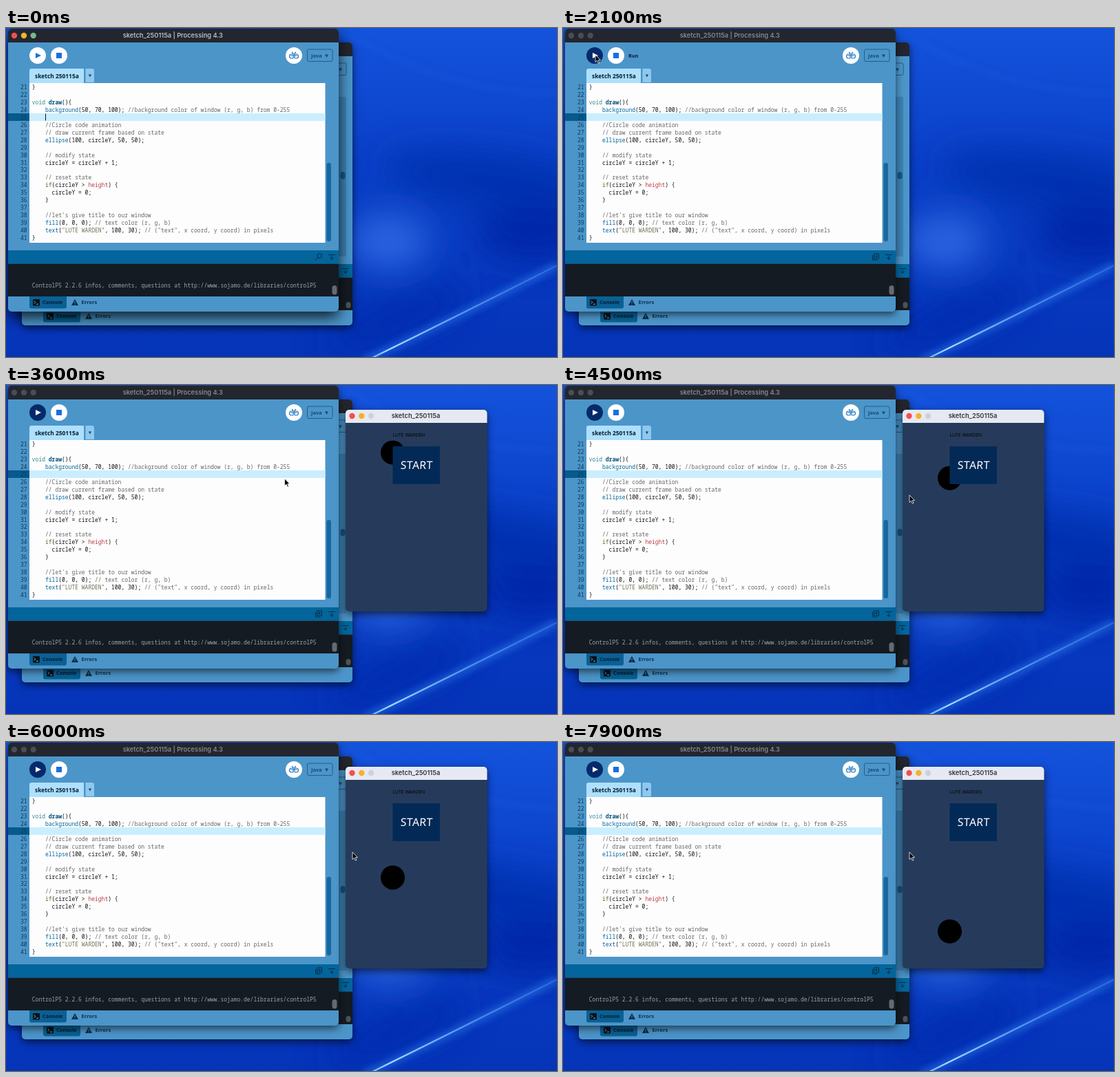
An HTML page for the animation above (8000 ms loop, 800 px wide and 478 px high).

```html
<!DOCTYPE html>
<html lang="en">
<head>
<meta charset="utf-8">
<title>Sketch launch</title>
<style>
html, body { margin: 0; width: 100%; height: 100%; overflow: hidden; background: #0838c0 }
svg { display: block; width: 800px; height: 478px }
text { white-space: pre }
.code { font: 8px "Noto Sans Mono", monospace }
.ui { font: 700 7.5px "Noto Sans", sans-serif; fill: #041c30 }
.title { font: 600 9.25px Inter, sans-serif; text-anchor: middle }
.shadow { filter: drop-shadow(0 4px 6px #0009) }
.shadow.active { filter: drop-shadow(0 8px 10px #000c) }
.com { fill: #666 }
.str { fill: #6d7050 }
.typ { fill: #2b8a90 }
.fun { fill: #006699 }
.def { fill: #00507a; font-weight: 700 }
.key { fill: #55702a }
.var { fill: #bd3b45 }
</style>
</head>
<body>
<svg viewBox="0 0 800 478">
  <defs>
    <linearGradient id="sky" x1="0" y1="0" x2="0" y2="1">
      <stop offset="0" stop-color="#1453dc"/><stop offset=".4" stop-color="#0a40c8"/><stop offset="1" stop-color="#0534b8"/>
    </linearGradient>
    <linearGradient id="ray" x1="500" x2="800" y1="0" y2="0" gradientUnits="userSpaceOnUse">
      <stop offset="0" stop-color="#5cc4ff" stop-opacity=".6"/><stop offset=".2" stop-color="#a8dcff"/><stop offset=".6" stop-color="#5c9cf4" stop-opacity=".8"/><stop offset="1" stop-color="#3f80e8" stop-opacity=".5"/>
    </linearGradient>
    <filter id="soft" x="-50%" y="-50%" width="200%" height="200%"><feGaussianBlur stdDeviation="24"/></filter>
    <filter id="haze" x="-20%" y="-20%" width="140%" height="140%"><feGaussianBlur stdDeviation="5"/></filter>
    <clipPath id="pane"><rect x="493" y="55" width="205" height="274"/></clipPath>

    <g id="shell">
      <rect x="3" y="1" width="480" height="411" rx="5" fill="#4c95c9"/>
      <path d="M3 21V6a5 5 0 0 1 5-5H478a5 5 0 0 1 5 5V21Z" fill="#23262f"/>
      <rect x="437.500" y="31" width="36.500" height="17.500" rx="2" fill="none" stroke="#1c5f91"/>
      <text class="ui" x="443" y="42.700" style="fill:#174c78;font-weight:600">Java</text>
      <path d="M463 38.500h5l-2.500 4.500Z" fill="#174c78"/>
      <path d="M3 323H483V342.500H3Z" fill="#03659c"/>
      <path d="M3 342.500H483V390H3Z" fill="#141b22"/>
      <path d="M468 329.500h10M473 331v5m-2.500 -2.500l2.500 3l2.500 -3" fill="none" stroke="#082b45"/>
      <path d="M34 390H88V404.500a3 3 0 0 1 -3 3H37a3 3 0 0 1 -3 -3Z" fill="#0a6094"/>
      <rect x="39" y="394" width="10" height="9.500" rx="1" fill="#07131d"/>
      <path d="M40.800 396.500l2 2l-2 2M44 401.200h3" fill="none" stroke="#b9d9ee" stroke-width=".8"/>
      <text class="ui" x="53" y="401.200">Console</text>
      <path d="M100 394l5 9H95Z" fill="#092d49"/>
      <path d="M100 397v3m0 1v1" stroke="#4c95c9"/>
      <text class="ui" x="109.500" y="401.200" style="fill:#0a3350">Errors</text>
    </g>
  </defs>

  <rect width="800" height="478" fill="url(#sky)"/>
  <g filter="url(#soft)">
    <ellipse cx="720" cy="225" rx="170" ry="40" fill="#0230b0" transform="rotate(8 720 225)"/>
    <ellipse cx="765" cy="300" rx="80" ry="40" fill="#0128a8"/>
    <ellipse cx="555" cy="310" rx="60" ry="40" fill="#2a64e0"/>
    <ellipse cx="570" cy="420" rx="110" ry="24" fill="#042cae" transform="rotate(-22 570 420)"/>
  </g>
  <g fill="none">
    <path d="M500 10Q640 95 800 95" stroke="#2766e6" stroke-width="5" opacity=".3" filter="url(#haze)"/>
    <path d="M520 484Q660 418 800 345" stroke="#2f7cf0" stroke-width="12" opacity=".5" filter="url(#haze)"/>
    <path d="M530 480Q660 416 800 345" stroke="url(#ray)" stroke-width="2.500"/>
  </g>

  <g class="shadow">
    <use href="#shell" x="20" y="20"/>
    <path d="M483 100H494V332H483Z" fill="#3c82b5"/>
    <rect x="485.500" y="209" width="7" height="10.500" rx="3.500" fill="#1a557f"/>
    <rect x="493.500" y="398" width="7" height="9" rx="3.500" fill="#4d5257"/>
  </g>

  <g id="editor" class="shadow">
    <use href="#shell"/>
    <rect x="473.500" y="374" width="7" height="13.500" rx="3.500" fill="#666a70"/>
    <g id="lights"></g>
    <text id="title" class="title" x="242.300" y="14.300">sketch_250115a | Processing 4.3</text>
    <circle id="play" cx="46" cy="40" r="12"/>
    <path id="arrow" d="M43 36l8 4l-8 4Z"/>
    <circle cx="77" cy="40" r="12" fill="#fff"/>
    <path d="M73 36h8v8h-8Z" fill="#1b6fe0"/>
    <text id="hint" class="ui" x="95" y="42.700" style="font-size:7.2px">Run</text>
    <circle cx="418" cy="40" r="12" fill="#fff"/>
    <g fill="none" stroke="#2378c0" stroke-width="1.200">
      <path d="M415 35l2 2v7M421 35l-2 2v7M413 40h10"/>
      <path d="M417 38h-2.500a1.500 1.500 0 0 0 0 6h2.500M419 38h2.500a1.500 1.500 0 0 1 0 6h-2.500"/>
    </g>
    <path d="M34 80V62a3 3 0 0 1 3 -3H113V80Z" fill="#aee0fd"/>
    <text class="ui" x="42" y="72.700" style="font-size:8.4px">sketch 250115a</text>
    <path d="M115.500 59H125a3 3 0 0 1 3 3V79H115.500Z" fill="#8ec8ee"/>
    <path d="M119.700 67.500h4.400l-2.200 4Z" fill="#174c78"/>
    <path d="M34 80H463.500V312H34Z" fill="#fdfdfe"/>
    <path d="M3 124H34V135H3Z" fill="#075a8c"/>
    <path d="M34 124H463.500V135H34Z" fill="#caeefe"/>
    <rect x="465.500" y="196" width="6.500" height="114" rx="3" fill="#17689f"/>
    <g id="code" class="code"></g>
    <path id="caret" d="M57.500 124.500v10" stroke="#111"/>
    <g fill="none" stroke="#082b45">
      <path id="find" d="M458.500 331a3.300 3.300 0 1 0 -6.600 0a3.300 3.300 0 1 0 6.600 0M452.700 333.500l-3 3.500"/>
      <path id="copy" d="M451.500 328h7v7h-7ZM449.500 330v7h7M455 329.500v4m-2 -2h4"/>
    </g>
    <text id="log" class="code" x="37.800" y="376.900" fill="#9da3a8">ControlP5 2.2.6 infos, comments, questions at http://www.sojamo.de/libraries/controlP5</text>
  </g>

  <g id="app" class="shadow">
    <rect x="493" y="36" width="205.500" height="293" rx="5" fill="#263b5b"/>
    <path d="M493 55V41a5 5 0 0 1 5 -5H693.500a5 5 0 0 1 5 5V55Z" fill="#e7e9f2"/>
    <circle cx="502.500" cy="45" r="4.200" fill="#f4504c"/>
    <circle cx="516.300" cy="45" r="4.200" fill="#f5b02c"/>
    <circle cx="530" cy="45" r="4.200" fill="#cfd1d8"/>
    <text class="title" x="595" y="48.300" fill="#33353b">sketch_250115a</text>
    <g clip-path="url(#pane)"><circle id="ball" cx="561.500" r="17.500"/></g>
    <text x="561.500" y="75.300" style="font:6.9px 'Open Sans',sans-serif">LUTE WARDEN</text>
    <path d="M561.500 89H630V144H561.500Z" fill="#032a57"/>
    <text transform="translate(572.500 121.500) skewX(-3)" fill="#fff" style="font:500 15.8px 'Noto Sans',sans-serif;letter-spacing:.4px">START</text>
  </g>

  <path id="cursor" d="M0 0V10.500L2.500 8.300L4.300 12.200L6 11.400L4.200 7.700H7.500Z" stroke="#fff" stroke-width=".8"/>
</svg>
<script>
const el = id => document.getElementById(id);
const show = (id, on) => el(id).setAttribute("visibility", on ? "visible" : "hidden");
const fill = (id, color) => el(id).setAttribute("fill", color);

const source = `}

void draw(){
    background(50, 70, 100); //background color of window (r, g, b) from 0-255

    //Circle code animation
    // draw current frame based on state
    ellipse(100, circleY, 50, 50);

    // modify state
    circleY = circleY + 1;

    // reset state
    if(circleY > height) {
      circleY = 0;
    }

    //let's give title to our window
    fill(0, 0, 0); // text color (r, g, b)
    text("LUTE WARDEN", 100, 30); // ("text", x coord, y coord) in pixels
}`;
const kinds = ["com", "str", "typ", "def", "key", "var", "fun"];
const tokens = /(\/\/.*)|("[^"]*")|\b(void)\b|\b(draw)\b|\b(if)\b|\b(height)\b|\b(background|ellipse|fill|text)\b/g;
const paint = line => line.replace(tokens, (word, ...groups) =>
  `<tspan class="${kinds[groups.findIndex(Boolean)]}">${word}</tspan>`);

el("code").innerHTML = source.split("\n").map((line, i) => {
  const y = 89 + i * 10.95;
  return `<text x="30.5" y="${y}" text-anchor="end" fill="#0b3a5c">${21 + i}</text>
    <text x="37.8" y="${y}" fill="#111">${paint(line)}</text>`;
}).join("");
el("lights").innerHTML = [12, 26, 39.7].map(x => `<circle cx="${x}" cy="11" r="4.2"/>`).join("");

// Pointer stops: time in seconds, x, y
const route = [[0.7, 610, 440], [1.4, 47, 39], [2.8, 47, 39], [3.5, 404.5, 136], [3.7, 404.5, 136], [4.2, 503, 160]];
function pointer(t) {
  const i = route.findIndex(stop => stop[0] > t);
  if (i < 0) return route.at(-1).slice(1);
  const [a, b] = [route[Math.max(i - 1, 0)], route[i]];
  const u = a === b ? 0 : (t - a[0]) / (b[0] - a[0]);
  const k = u * u * (3 - 2 * u);
  return [1, 2].map(n => a[n] + (b[n] - a[n]) * k);
}

function render(t) {
  const active = t < 1.9, running = t >= 1.5;
  const colors = active ? ["#f2504b", "#f3b32e", "#79b98a"] : Array(3).fill("#4a4d54");
  [...el("lights").children].forEach((dot, i) => dot.setAttribute("fill", colors[i]));
  el("editor").classList.toggle("active", active);
  fill("title", active ? "#b9bcc1" : "#85888e");
  fill("play", running ? "#052a6b" : "#fff");
  fill("arrow", running ? "#fff" : "#1b6fe0");
  show("hint", t >= 1.4 && t < 2.9);
  show("caret", active && t % 1 < 0.5);
  show("find", !running);
  show("copy", running);
  show("log", !running || t >= 2.8);
  show("app", t >= 2.5);
  el("ball").setAttribute("cy", 98.2 + 41.15 * (t - 3.6));
  show("cursor", t >= 0.7);
  el("cursor").setAttribute("transform", `translate(${pointer(t)})`);
}

const start = performance.now();
function tick() {
  render(Math.floor((performance.now() - start) % 8000 / 100) / 10);
  requestAnimationFrame(tick);
}
tick();
</script>
</body>
</html>
```
